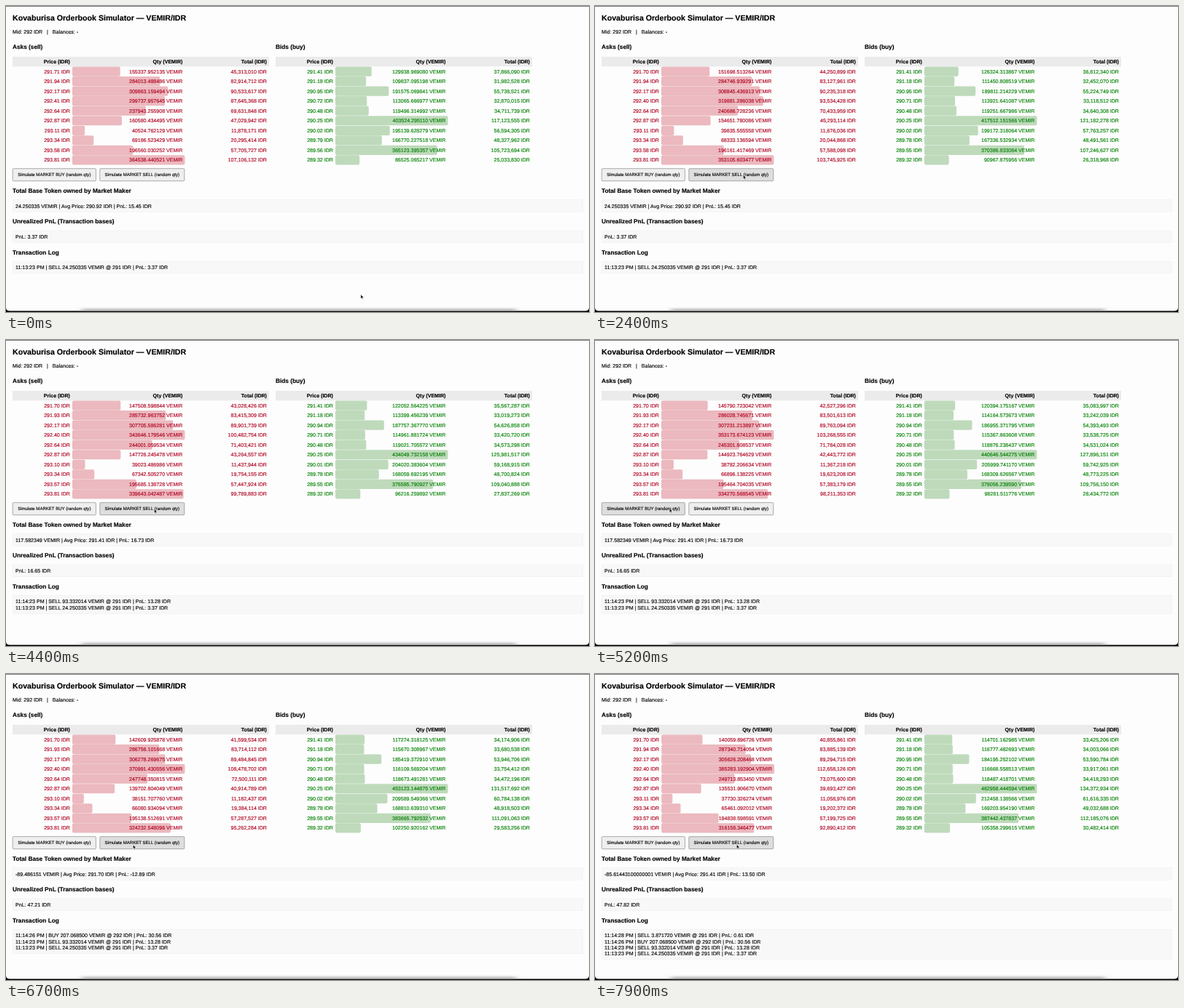
Animation, 800 px wide and 421 px high, one loop 8000 ms. Source, as an HTML page:

```html
<!DOCTYPE html>
<html lang="en">
<head>
<meta charset="utf-8">
<title>Orderbook Simulator</title>
<style>
  html, body { margin: 0; width: 100%; height: 100%; overflow: hidden; background: #000; }
  svg { display: block; width: 100%; height: 100%; }
  text {
    font: 7.07px "Liberation Sans", Arial, sans-serif;
    white-space: pre;
    text-rendering: geometricPrecision;
    color: #000;
    fill: currentColor;
    stroke: currentColor;
    stroke-width: 0.14px;
  }
  .title { font-size: 10.62px; font-weight: bold; }
  .section { font-size: 8.27px; font-weight: bold; }
  .head { font-weight: bold; }
  .button { font-size: 6.06px; }
  .end { text-anchor: end; }
  .mid { text-anchor: middle; }
  .ask { color: #b00020; }
  .bid { color: #008000; }
</style>
</head>
<body>
<svg id="stage" viewBox="0 0 800 421" xmlns="http://www.w3.org/2000/svg">
  <defs>
    <clipPath id="window"><path d="M0 .5H800V414.5Q800 419.6 795 419.6H5Q0 419.6 0 414.5Z"/></clipPath>
    <filter id="soft" x="-10%" y="-200%" width="120%" height="500%"><feGaussianBlur stdDeviation="4 1.6"/></filter>
  </defs>
</svg>
<script>
const LOOP = 8000, STEP = 100, LAST_TICK = 72;
const TOKEN = 'VEMIR', PAIR = TOKEN + '/IDR';
const FONT = 7.07, PAD = 3.03, ROWS = 10, ROW_TOP = 83.4, ROW_H = 13.53, TABLE_W = 352;
const SPREAD = 0.0005, LEVEL = 1.0008;

// Quantities in thousands, drifting from the first to the last tick.
const askDrift = {
  from: [155.3, 284, 309.9, 299.7, 237.9, 160.6, 40.5, 69.2, 196.6, 364.5],
  to: [140.1, 287.3, 305.6, 385.3, 249.7, 135.5, 37.7, 65.5, 194.8, 316.2]
};
const bidDrift = {
  from: [129.9, 109.8, 191.6, 113.1, 119.5, 403.5, 195.1, 166.8, 365.1, 86.5],
  to: [114.7, 116.8, 184.2, 116.7, 118.5, 463, 212.5, 169.2, 387.4, 105.4]
};

const trades = [
  { at: 0, text: `11:13:23 PM | SELL 24.250335 ${TOKEN} @ 291 IDR | PnL: 3.37 IDR` },
  { at: 2600, text: `11:14:23 PM | SELL 93.332014 ${TOKEN} @ 291 IDR | PnL: 13.28 IDR` },
  { at: 5600, text: `11:14:26 PM | BUY 207.068500 ${TOKEN} @ 292 IDR | PnL: 30.56 IDR` },
  { at: 7000, text: `11:14:28 PM | SELL 3.871720 ${TOKEN} @ 291 IDR | PnL: 0.61 IDR` }
];
const holdings = [
  { at: 0, qty: '24.250335', avg: '290.92', pnl: '15.45', sum: '3.37' },
  { at: 2600, qty: '117.582349', avg: '291.41', pnl: '16.73', sum: '16.65' },
  { at: 5600, qty: '-89.486151', avg: '291.70', pnl: '-13.21', sum: '47.21' },
  { at: 6400, qty: '-89.486151', avg: '291.70', pnl: '-12.89', sum: '47.21' },
  { at: 7000, qty: '-85.61443100000001', avg: '291.41', pnl: '13.50', sum: '47.82' }
];
const moves = [
  { from: 900, to: 1400, x: 183.5, y: 232.5 },
  { from: 1400, to: 1800, x: 203.5, y: 232.5 },
  { from: 4600, to: 5300, x: 96.3, y: 231.5 },
  { from: 6100, to: 6500, x: 174.4, y: 235 },
  { from: 6800, to: 7000, x: 194.4, y: 234.6 }
];

const stage = document.getElementById('stage');
const ruler = document.createElement('canvas').getContext('2d');

const mix = (a, b, u) => a + (b - a) * u;

function noise(n) {
  const s = Math.sin(n * 12.9898) * 43758.5453;
  return s - Math.floor(s);
}
function set(el, attrs) {
  for (const k in attrs) el.setAttribute(k, attrs[k]);
}
function add(tag, attrs, parent = page) {
  const el = document.createElementNS('http://www.w3.org/2000/svg', tag);
  set(el, attrs);
  return parent.appendChild(el);
}
function label(x, y, cls, text = '') {
  const el = add('text', { x, y, class: cls });
  el.textContent = text;
  return el;
}
function panel(y, height) {
  return add('rect', { x: 9.25, y, width: 782, height, fill: '#f8f8f8', stroke: '#eeeeee', 'stroke-width': 0.5 });
}
function widest(texts, weight = '') {
  ruler.font = `${weight} 100px "Liberation Sans", Arial, sans-serif`;
  return Math.max(...texts.map(s => ruler.measureText(s).width)) * FONT / 100;
}

const page = add('g', { 'clip-path': 'url(#window)' }, stage);
add('rect', { width: 800, height: 421, fill: '#fdfdfd' });
label(9, 19.8, 'title', `Kovaburisa Orderbook Simulator — ${PAIR}`);
label(9, 37.5, '', 'Mid: 292 IDR\u00a0\u00a0\u00a0|\u00a0\u00a0\u00a0Balances: -');

const heads = ['Price (IDR)', `Qty (${TOKEN})`, 'Total (IDR)'];

function makeTable(x, title, cls, barFill) {
  label(x, 59.4, 'section', title);
  add('rect', { x, y: 69.8, width: TABLE_W, height: 13.5, fill: '#ebebeb' });
  const head = heads.map(h => label(0, 78.9, 'head end', h));
  const rows = Array.from({ length: ROWS }, (_, i) => {
    const y = ROW_TOP + i * ROW_H;
    return {
      bar: add('rect', { y: y + 0.1, height: 13.2, rx: 2, fill: barFill }),
      cells: heads.map(() => label(0, y + 9.2, cls + ' end'))
    };
  });
  return { x, head, rows };
}

// Column widths share the spare room in proportion to their content.
function fillTable(table, qty, price) {
  const data = qty.map((q, i) => [
    price(i).toFixed(2) + ' IDR',
    q.toFixed(6) + ' ' + TOKEN,
    Math.round(q * price(i)).toLocaleString('en-US') + ' IDR'
  ]);
  const need = heads.map((h, c) =>
    Math.max(widest([h], 'bold'), widest(data.map(r => r[c]))) + 2 * PAD);
  const scale = TABLE_W / (need[0] + need[1] + need[2]);
  let right = table.x;
  const edges = need.map(w => right += w * scale);
  const top = Math.max(...qty);
  edges.forEach((e, c) => set(table.head[c], { x: e - PAD }));
  table.rows.forEach((row, i) => {
    set(row.bar, { x: edges[0], width: (edges[1] - edges[0]) * qty[i] / top });
    row.cells.forEach((cell, c) => {
      set(cell, { x: edges[c] - PAD });
      cell.textContent = data[i][c];
    });
  });
}

function quantities(drift, tick, seed) {
  return drift.from.map((q, i) => {
    const jitter = noise(seed + i * 7.3 + tick * 0.61) - 0.5;
    return 1000 * mix(q, drift.to[i], tick / LAST_TICK) + 90 * jitter;
  });
}

const asks = makeTable(9, 'Asks (sell)', 'ask', '#ebb9bf');
const bids = makeTable(370, 'Bids (buy)', 'bid', '#bedabb');

function makeButton(x, width, text) {
  const rect = add('rect', { x, y: 223.7, width, height: 17, rx: 1.2, stroke: '#767676', 'stroke-width': 0.6 });
  label(x + width / 2, 234.3, 'button mid', text);
  return { x, width, rect };
}
const buttons = [
  makeButton(9.2, 114.2, 'Simulate MARKET BUY (random qty)'),
  makeButton(128.8, 116, 'Simulate MARKET SELL (random qty)')
];

label(9, 257, 'section', 'Total Base Token owned by Market Maker');
panel(266.6, 16.6);
const holdingText = label(13, 277.6, '');
label(9, 299.3, 'section', 'Unrealized PnL (Transaction bases)');
panel(309, 16.6);
const pnlText = label(13, 319.9, '');
label(9, 341.7, 'section', 'Transaction Log');
const logPanel = panel(351.4, 16.6);
const logLines = trades.map((_, i) => label(13, 362.3 + i * 8.25, ''));

add('rect', { x: 104, y: 416.6, width: 596, height: 7, fill: '#b4b4b4', filter: 'url(#soft)' });
const cursor = add('path', {
  d: 'M0 0V5.6L1.3 4.4L2.2 6.4L3.1 6L2.3 4.1H4Z',
  fill: '#000', stroke: '#fff', 'stroke-width': 0.5
});

function cursorAt(t) {
  let p = { x: 486.8, y: 397 };
  for (const m of moves) {
    const u = Math.min(1, Math.max(0, (t - m.from) / (m.to - m.from)));
    const e = u * u * (3 - 2 * u);
    p = { x: mix(p.x, m.x, e), y: mix(p.y, m.y, e) };
  }
  return p;
}

function render(t) {
  // The feed pauses shortly after the start.
  const tick = t < 1000 ? Math.min(t / STEP, 2) : t / STEP - 7;
  // The mid price dips and recovers.
  const mid = 291.5552 + 2.47e-6 * (tick - 45) ** 2;
  fillTable(asks, quantities(askDrift, tick, 1), i => mid * (1 + SPREAD) * LEVEL ** i);
  fillTable(bids, quantities(bidDrift, tick, 101), i => mid * (1 - SPREAD) / LEVEL ** i);

  const h = holdings.filter(e => e.at <= t).pop();
  holdingText.textContent = `${h.qty} ${TOKEN} | Avg Price: ${h.avg} IDR | PnL: ${h.pnl} IDR`;
  pnlText.textContent = `PnL: ${h.sum} IDR`;

  const log = trades.filter(e => e.at <= t).reverse();
  logLines.forEach((line, i) => line.textContent = log[i] ? log[i].text : '');
  set(logPanel, { height: 16.6 + (log.length - 1) * 8.25 });

  // Buttons react to the pointer one step late.
  const p = cursorAt(t), past = cursorAt(t - STEP);
  set(cursor, { transform: `translate(${p.x} ${p.y})` });
  for (const b of buttons) {
    const over = past.x > b.x && past.x < b.x + b.width && past.y > 223.7 && past.y < 240.7;
    set(b.rect, { fill: over ? '#dedede' : '#efefef' });
  }
}

const start = performance.now();
let last = -1;
function frame() {
  const t = Math.floor((performance.now() - start) % LOOP / STEP) * STEP;
  if (t !== last) render(last = t);
  requestAnimationFrame(frame);
}
frame();
</script>
</body>
</html>
```
